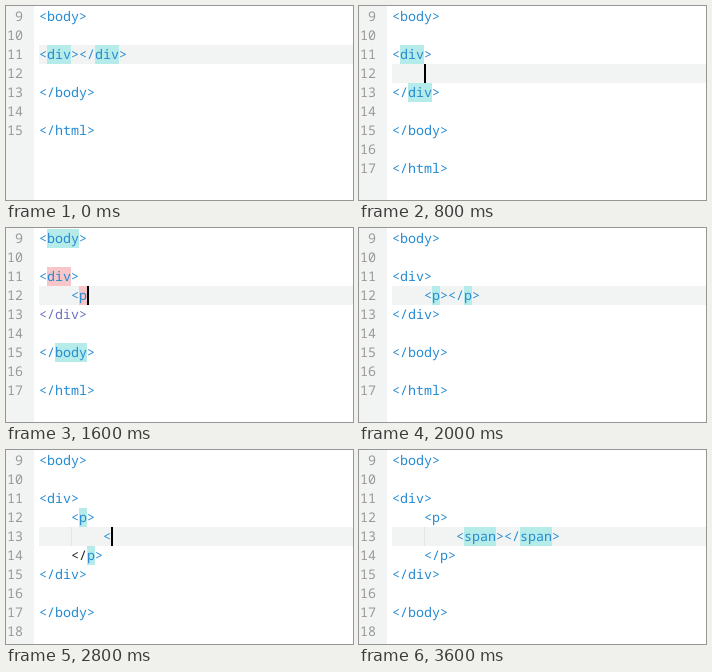
Animation of 347 by 194 pixels, one loop 3900 ms. Source, as an HTML page:

```html
<!DOCTYPE html>
<html lang="en">
<head>
<meta charset="utf-8">
<title>Typing nested tags</title>
<style>
  html, body { margin: 0; width: 100%; height: 100%; overflow: hidden; background: #fff; }
  svg { display: block; width: 347px; height: 194px; }
  text { font: 13.333px "Noto Sans Mono", "DejaVu Sans Mono", monospace; white-space: pre; text-rendering: geometricPrecision; }
</style>
</head>
<body>
<svg id="stage" viewBox="0 0 347 194"></svg>
<script>
(() => {
  const LOOP = 3900, FIRST = 9, LINE = 19, CHAR = 8, LEFT = 33;
  const BLUE = '#268bd2', VIOLET = '#6c71c4', DARK = '#222', GREY = '#999';
  const BAR = '#f2f4f4', TEAL = '#b5ece9', PINK = '#f8c6c8', GUIDE = '#e4e7e7';

  // Marks: [teal] {pink} (violet) !dark!
  const MARKS = /\[(.+?)\]|\{(.+?)\}|\((.+?)\)|!(.+?)!|[^\[{(!]+/g;

  const doc = (lines, name = 'body') =>
    [`<${name}>`, '', ...lines, '', `</${name}>`, '', '</html>'];
  const inP = (line, open = '<p>', close = '</p>', div = 'div') =>
    doc([`<${div}>`, '    ' + open, line && '        ' + line, '    ' + close, `</${div}>`]);

  const divPair = doc(['<[div]></[div]>']);
  const divOpen = doc(['<[div]>', '', '</[div]>']);
  const lessThan = doc(['<[div]>', '    <', '!</![div]>']);
  const pTyped = doc(['<{div}>', '    <{p}', '(</div>)'], '[body]');
  const pPair = doc(['<div>', '    <[p]></[p]>', '</div>']);
  const pOpen = inP('', '<[p]>', '</[p]>');
  const spanStart = inP('<', '<[p]>', '!</![p]>');
  const spanTyped = name => inP(`<{${name}}`, '<{p}>', '(</p>)', '[div]');
  const spanPair = inP('<[span]></[span]>');

  // start, lines, caret row, caret column, caret visible
  const STEPS = [
    [0, divPair, 11, 5, 0],
    [200, divPair, 11, 5, 1],
    [600, divPair, 11, 5, 0],
    [800, divOpen, 12, 4, 1],
    [1000, divOpen, 12, 4, 0],
    [1200, divOpen, 12, 4, 1],
    [1400, lessThan, 12, 5, 1],
    [1600, pTyped, 12, 6, 1],
    [1800, pPair, 12, 7, 1],
    [2000, pPair, 12, 7, 0],
    [2400, pOpen, 13, 8, 1],
    [2600, pOpen, 13, 8, 0],
    [2800, spanStart, 13, 9, 1],
    [3000, spanTyped('spa'), 13, 12, 1],
    [3200, spanTyped('span'), 13, 13, 1],
    [3400, spanPair, 13, 14, 1],
    [3600, spanPair, 13, 14, 0]
  ];

  const stage = document.getElementById('stage');
  const rowTop = row => 1 + (row - FIRST) * LINE;

  function add(tag, attrs, content = '') {
    const el = document.createElementNS('http://www.w3.org/2000/svg', tag);
    for (const key in attrs) el.setAttribute(key, attrs[key]);
    el.textContent = content;
    stage.append(el);
  }
  const rect = (x, y, width, height, fill) => add('rect', { x, y, width, height, fill });
  const label = (x, row, fill, str) => add('text', { x, y: rowTop(row) + 14, fill }, str);

  function drawLine(line, row) {
    const code = line.trimStart();
    let x = LEFT + (line.length - code.length) * CHAR;
    for (const [raw, teal, pink, violet, dark] of code.matchAll(MARKS)) {
      const str = teal || pink || violet || dark || raw;
      const width = str.length * CHAR;
      if (teal || pink) rect(x, rowTop(row), width, LINE, teal ? TEAL : PINK);
      label(x, row, violet ? VIOLET : dark ? DARK : BLUE, str);
      x += width;
    }
  }

  function draw([, lines, row, col, caret]) {
    stage.replaceChildren();
    rect(0, 0, 28, 194, BAR);
    rect(LEFT, rowTop(row), 347 - LEFT, LINE, BAR);
    if (row === 13) rect(65, rowTop(row), 1, LINE, GUIDE);
    lines.forEach((line, i) => {
      const n = FIRST + i;
      label(n < 10 ? 9 : 1, n, GREY, String(n));
      drawLine(line, n);
    });
    if (caret) rect(LEFT + col * CHAR, rowTop(row), 2, LINE, '#000');
  }

  let shown;
  function tick() {
    const t = performance.now() % LOOP;
    const step = STEPS.findLast(s => s[0] <= t);
    if (step !== shown) draw(shown = step);
    requestAnimationFrame(tick);
  }
  tick();
})();
</script>
</body>
</html>
```
